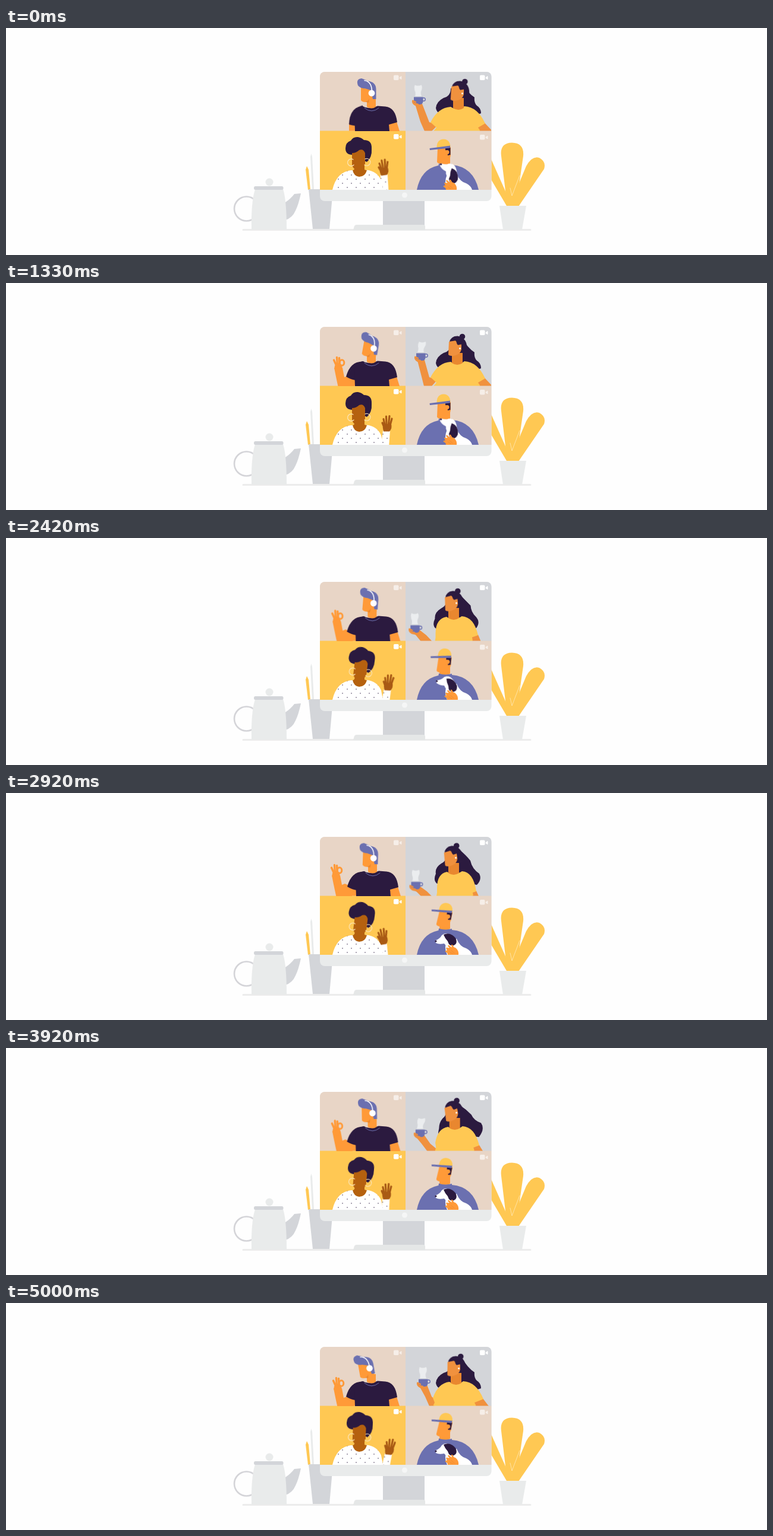
An HTML page without scripts that plays this animation: 1280 by 383 pixels, repeating every 5080 ms.

```html
<!DOCTYPE html>
<html lang="en">
<head>
<meta charset="utf-8">
<title>Video call</title>
<style>
html, body { margin: 0; width: 100%; height: 100%; overflow: hidden; background: #fefefe; }
svg { display: block; width: 100%; height: 100%; }

:root {
  --navy: #2b1a3f; --blue: #6b70b0; --yellow: #ffc853; --skin: #ff9a38;
  --tan: #f0913e; --brown: #b5610f; --beige: #e8d5c6; --mid: #d3d5d9; --pale: #e9ebeb;
}
.navy { fill: var(--navy); } .blue { fill: var(--blue); } .yellow { fill: var(--yellow); }
.skin { fill: var(--skin); } .tan { fill: var(--tan); } .brown { fill: var(--brown); }
.beige { fill: var(--beige); } .mid { fill: var(--mid); } .pale { fill: var(--pale); }
.white { fill: #fff; } .shade { fill: #e9872f; }
.line { fill: none; stroke-linecap: round; stroke-linejoin: round; }

.move { animation: 5.08s ease-in-out infinite; }

/* Listener with headphones */
.dj-head { animation-name: dj-head; transform-origin: 614px 130px; }
@keyframes dj-head {
  0%, 5% { transform: none; }
  17%, 41% { transform: rotate(10deg); }
  52%, 74% { transform: translateX(2.5px) rotate(2deg); }
  83%, 100% { transform: rotate(-10deg); }
}
.dj-body { animation-name: dj-body; }
@keyframes dj-body {
  0%, 41% { transform: none; }
  52%, 74% { transform: translateX(2px); }
  83%, 100% { transform: none; }
}
.dj-sleeve { animation-name: dj-sleeve; transform-origin: 594px 140px; }
@keyframes dj-sleeve {
  0%, 6% { transform: rotate(-14deg); }
  18%, 100% { transform: none; }
}
.dj-arm { animation-name: dj-arm; }
@keyframes dj-arm {
  0%, 6% { transform: translate(8px, 54px); }
  18%, 41% { transform: none; }
  52%, 74% { transform: translate(-4px, -4px); }
  83%, 100% { transform: translate(-1px, 1px); }
}

/* Coffee drinker */
.cof-head { animation-name: cof-head; transform-origin: 763px 110px; }
@keyframes cof-head {
  0% { transform: translate(4px, 0) rotate(1deg); }
  26.2% { transform: none; }
  37.8% { transform: translate(-5px, 0) rotate(-1.5deg); }
  57.5% { transform: translate(-7px, -1px) rotate(-8deg); }
  70.5% { transform: translate(-8px, -2px) rotate(-13deg); }
  85.2% { transform: translate(-3px, 0) rotate(-6deg); }
  98.4%, 100% { transform: translate(-2px, 0) rotate(-2deg); }
}
.cof-neck { animation-name: cof-neck; }
@keyframes cof-neck {
  0% { transform: translateX(2px); }
  26.2% { transform: none; }
  37.8%, 70.5% { transform: translateX(-6px); }
  85.2%, 100% { transform: translateX(-2px); }
}
.cof-hair { animation-name: cof-hair; }
@keyframes cof-hair {
  0%, 26.2%, 98.4%, 100% { d: path("M748 102Q748 115 736 118Q724 124 723 135Q724 142 730 144L780 150L799 144Q799 135 792 131Q787 126 788 117Q776 109 768 94Z"); }
  37.8% { d: path("M742 102Q742 115 731 119Q720 125 720 136Q714 148 722 153L782 147L790 149Q796 138 785 130Q780 122 782 114Q772 106 763 94Z"); }
  57.5% { d: path("M740 100Q743 114 732 119Q721 126 723 136Q718 148 725 153L775 152L792 155Q801 146 796 136Q784 128 781 114Q774 105 762 95Z"); }
  70.5% { d: path("M740 100Q741 114 734 119Q729 126 729 136Q726 146 728 150L780 148L795 151Q807 137 800 126Q787 122 782 112Q773 102 760 95Z"); }
}
.cof-shirt { animation-name: cof-shirt; }
@keyframes cof-shirt {
  0%, 26.2% { d: path("M748 133Q727 134 714 159L724 168L719 174H798L794 168L806 161Q793 133 771 132Q761 141 748 133Z"); }
  37.8% { d: path("M740 133Q721 136 720 160L720 168L719 174H784L783 167L797 162Q788 133 766 132Q752 141 740 133Z"); }
  57.5%, 70.5% { d: path("M742 133Q725 136 725 160L725 168L724 174H786L785 168L791 166Q786 133 767 132Q754 141 742 133Z"); }
  85.2%, 100% { d: path("M746 133Q727 135 718 160L721 168L718 174H791L788 168L803 162Q791 133 769 132Q758 141 746 133Z"); }
}
.cof-far { animation-name: cof-far; }
@keyframes cof-far {
  0%, 26.2% { d: path("M790 165L805 160L818 174L797 174Z"); }
  37.8% { d: path("M782 166L797 161L802 174L784 174Z"); }
  57.5%, 70.5% { d: path("M783 167L791 165L795 174L785 174Z"); }
  85.2%, 100% { d: path("M786 166L802 161L812 174L790 174Z"); }
}
.cof-arm { animation-name: cof-arm; }
@keyframes cof-arm {
  0% { d: path("M687 125L700 128L712 159L727 163L716 174L704 174L697 158Z"); }
  26.2% { d: path("M691 127L704 130L712 159L726 163L716 174L703 174L699 158Z"); }
  37.8% { d: path("M680 154L694 152L706 162L717 174L716 174L697 174L688 161Z"); }
  57.5% { d: path("M682 160L697 158L708 166L716 174L715 174L698 174L690 166Z"); }
  70.5% { d: path("M684 156L699 152L712 164L724 174L723 174L706 174L694 163Z"); }
  85.2%, 100% { d: path("M694 138L708 138L716 158L725 166L720 174L712 174L705 158Z"); }
}
.cup { animation-name: cup; }
@keyframes cup {
  0% { transform: translate(-4px, -2px); }
  26.2% { transform: none; }
  37.8% { transform: translate(-11px, 26px); }
  57.5% { transform: translate(-8.5px, 31.5px); }
  70.5% { transform: translate(-5px, 26px); }
  85.2%, 100% { transform: translate(4px, 10px); }
}
.steam { animation: steam 1.27s ease-in-out infinite alternate; transform-origin: 697px 117px; }
@keyframes steam { from { transform: skewX(4deg); } to { transform: skewX(-6deg) scaleY(.95); } }

/* Waving caller */
.wav-head { animation-name: wav-head; transform-origin: 595px 248px; }
@keyframes wav-head {
  0%, 26.2% { transform: none; }
  37.8%, 57.5% { transform: rotate(7deg); }
  70.5% { transform: rotate(6deg); }
  85.2% { transform: rotate(4deg); }
  98.4%, 100% { transform: rotate(2.5deg); }
}
.wave { animation-name: wave; transform-origin: 638px 280px; }
@keyframes wave {
  0% { transform: translateY(-2px) rotate(-8deg); }
  26.2% { transform: none; }
  37.8% { transform: translateY(8px) rotate(16deg); }
  57.5% { transform: translateY(5px) rotate(-10deg); }
  70.5% { transform: translateY(5px) rotate(-3deg); }
  85.2% { transform: translateY(5px) rotate(1deg); }
  98.4%, 100% { transform: translateY(5px) rotate(6deg); }
}

/* Dog owner */
.cap-head { animation-name: cap-head; transform-origin: 740px 213px; }
@keyframes cap-head {
  0%, 43% { transform: none; }
  52%, 100% { transform: translate(1px, -1.5px) rotate(11deg); }
}
.dog-head { animation-name: dog-head; transform-origin: 755px 252px; }
@keyframes dog-head {
  0%, 42% { transform: rotate(40deg); }
  52%, 100% { transform: none; }
}
.dog-ear { animation-name: dog-ear; transform-origin: 747px 247px; }
@keyframes dog-ear {
  0%, 42% { transform: translate(5px, 3px) rotate(44deg); }
  52%, 100% { transform: none; }
}
.paw { animation-name: paw; }
@keyframes paw {
  0%, 42% { transform: translateX(-3px); }
  52%, 100% { transform: none; }
}
</style>
</head>
<body>
<svg viewBox="0 0 1280 383" role="img" aria-label="Four people in a video call on a desktop screen">
  <defs>
    <clipPath id="tl"><path d="M528 74H672V173.500H528Z"/></clipPath>
    <clipPath id="tr"><path d="M672 74H816V173.500H672Z"/></clipPath>
    <clipPath id="bl"><path d="M528 173.500H672V273H528Z"/></clipPath>
    <clipPath id="br"><path d="M672 173.500H816V273H672Z"/></clipPath>
    <clipPath id="screen"><rect x="528" y="74" width="288.500" height="218" rx="8"/></clipPath>
    <pattern id="dots" width="15" height="14" patternUnits="userSpaceOnUse">
      <path fill="#fff" d="M0 0H15V14H0Z"/>
      <circle class="navy" cx="4" cy="3" r=".75"/>
      <circle class="navy" cx="11" cy="10" r=".75"/>
    </pattern>
    <g id="cam"><rect width="8.500" height="8.500" rx="1.800"/><path d="M10 4.200L13 2V7L10 5Z" stroke="#fff" stroke-linejoin="round"/></g>
  </defs>

  <!-- Desk -->
  <path class="line" d="M399 340.500H882" stroke="#ececec" stroke-width="3"/>
  <circle class="line" cx="404.500" cy="305" r="20.500" stroke="#d4d4d8" stroke-width="2.600"/>
  <path class="mid" d="M470 294Q479 288 485 280L496 279Q492 298 487 308Q482 320 470 324Z"/>
  <path class="pale" d="M419 272H466Q472 290 472 340H413Q412 294 419 272Z"/>
  <circle class="pale" cx="443" cy="260" r="6.500"/>
  <rect class="mid" x="417" y="267" width="49.500" height="6" rx="2.500"/>
  <path class="yellow" d="M504 239L506 233L509 239L512 273H508Z"/>
  <path class="pale" d="M512 217L513.500 212L515 217L518 273H515Z"/>
  <path class="mid" d="M509 272H550L544 339H516Z"/>

  <g class="yellow">
    <path d="M815 219L851 300H842L815 254Z"/>
    <path d="M843 300L833 216Q830 194 851 193.500Q872 194 870 216L858 300Z"/>
    <path d="M847 300L875 233Q885 215 897 219Q909 225 905 238L862 301Z"/>
  </g>
  <path class="line" d="M848 270L851 283L864 249" stroke="#fff3d8" stroke-width=".6"/>
  <path class="pale" d="M830 300H875L868 340H836Z"/>

  <!-- Monitor -->
  <path class="mid" d="M634 290H704V333H634Z"/>
  <path fill="#e5e7e7" d="M584 341L586 334Q587 332 590 332H702Q705 332 705 335V341Z"/>
  <g clip-path="url(#screen)">
    <path class="pale" d="M528 74H817V292H528Z"/>
    <path class="beige" d="M528 74H672V174H528Z"/>
    <path class="mid" d="M672 74H817V174H672Z"/>
    <path class="yellow" d="M528 173.500H672V273H528Z"/>
    <path class="beige" d="M672 173.500H817V273H672Z"/>
  </g>
  <circle cx="670.500" cy="282" r="4.500" fill="#f5f6f6"/>

  <!-- Listener with headphones -->
  <g clip-path="url(#tl)">
    <path class="skin" d="M577 160H589V174H577Z"/>
    <g class="move dj-arm">
      <path class="skin" d="M552 143L566 143L569 159L574 157L588 163L586 174V190H562Q556 164 552 143Z"/>
      <ellipse class="skin" cx="559" cy="143" rx="6.500" ry="8"/>
      <path class="line" d="M556 140L551.500 130M557.500 140L556.500 125.500M561 139L560.500 126.500" stroke="var(--skin)" stroke-width="3.400"/>
      <ellipse class="line" cx="565" cy="134.500" rx="3.800" ry="4.800" stroke="var(--skin)" stroke-width="3"/>
    </g>
    <g class="move dj-body">
      <path class="skin" d="M643 160L657 158L662 174H645Z"/>
      <path class="navy move dj-sleeve" d="M602 132.500Q579 131 572 158Q580 163 588 164L602 160Z"/>
      <path class="navy" d="M600 132Q588 134 586 148L587 174H645L644 163L658 159Q655 134 638 132.500L625 131.500Q610 138 600 132Z"/>
      <path class="skin" d="M607 120H622V133Q615 138 607 133Z"/>
      <path class="line" d="M603 135Q615 145 627 135" stroke="var(--blue)" stroke-width="1"/>
    </g>
    <g class="move dj-head">
      <path class="skin" d="M597 99V122Q600 126 608 124.500L609 132H621V101Z"/>
      <path class="shade" d="M604 124.500Q609 124 611 119L610 126Z"/>
      <path class="blue" d="M592 97Q588 86 598 85Q604 87 609 89.500Q622 91 622.500 103V120H617L613.500 105L604 102Q596 102 592 97Z"/>
      <path class="line" d="M603 88.500Q615 90 615.500 107" stroke="#fff" stroke-width="1.600"/>
      <circle class="white" cx="615" cy="110" r="5.400"/>
    </g>
  </g>

  <!-- Coffee drinker -->
  <g clip-path="url(#tr)">
    <path class="navy move cof-hair"/>
    <path class="tan move cof-far"/>
    <path class="tan move cof-arm"/>
    <path class="yellow move cof-shirt"/>
    <path class="shade move cof-neck" d="M750 118H768V135Q759 141 750 135Z"/>
    <g class="move cof-head">
      <circle class="navy" cx="767.500" cy="90.500" r="4.800"/>
      <path class="navy" d="M746 99Q749 89 760 89.500Q773 92 775 105L776 118H766Z"/>
      <path class="tan" d="M745 99L744 121Q747 124 754 122.500Q764 121 766 112V104L757 97Z"/>
      <path class="navy" d="M745.500 97Q757 94 758 101Q759 106 764 105L768 96L757 91Z"/>
      <circle class="tan" cx="763" cy="107" r="3"/>
      <circle class="white" cx="763.500" cy="110.500" r="1.400"/>
    </g>
    <g class="move cup">
      <path class="steam" fill="#ebedef" d="M692 117Q694 112 692 107Q691 102 693 98Q698 101 704 98Q706 103 703 108Q701 112 703 117Z"/>
      <path class="tan" d="M687 124Q689 122 693 127L703 130Q706 133 701 135L692 133Q686 130 687 124Z"/>
      <circle class="line" cx="706.500" cy="122.500" r="2.800" stroke="var(--blue)" stroke-width="1.400"/>
      <path class="blue" d="M690 118.500H705.500V126Q705 131 700 131H695Q690 131 690 125Z"/>
      <path class="line" d="M689 125L693 127M690 129L697 131" stroke="var(--tan)" stroke-width="2.400"/>
    </g>
  </g>

  <!-- Waving caller -->
  <g clip-path="url(#bl)">
    <g class="move wave">
      <path fill="url(#dots)" d="M634 249H646L643 290H629Z"/>
      <path class="line" stroke="#a95a14" stroke-width="3.200" d="M637 239L635 229.500M640 238L639.500 225M643.500 238L645 224.500M646 240L649 229M636 243L633 236"/>
      <path fill="#a95a14" d="M634 238H648Q650 245 645 250.500H635Q633 244 634 238Z"/>
    </g>
    <path fill="url(#dots)" d="M549 273Q556 243 580 240L606 239.500Q624 241 631 257L634 273Z"/>
    <path class="brown" d="M583 240Q587 240 587 232H603V239L607 240Q604 251 594 251Q585 250 583 240Z"/>
    <g class="move wav-head">
      <path class="navy" d="M583 214Q571 214 571 203Q571 193 580 190Q584 183 592 184Q598 185 602 189Q616 189 615 204Q616 218 607 226L598 222Z"/>
      <path class="brown" d="M582 211Q589 211 594 206Q601 203 604 211V229Q601 240 592 239Q583 239 582 230Z"/>
      <path class="line" d="M584 222A6 6 0 1 0 585 231M604 221A6 6 0 1 1 603 231" stroke="#fbe6bd" stroke-width="1.200"/>
    </g>
  </g>

  <!-- Dog owner -->
  <g clip-path="url(#br)">
    <path class="blue" d="M691 273Q698 238 727 232L750 231Q786 234 795 273Z"/>
    <path class="skin" d="M730 217H747V229Q739 233 729 229Z"/>
    <path class="blue" d="M728 228.500Q738 232 750 229V235H727Z"/>
    <g class="move cap-head">
      <path class="skin" d="M726 202L725 226Q727 230 736 228Q747 226 748 214V201Z"/>
      <path class="navy" d="M739 202H747.500V214L743 215L742 207L739 206Z"/>
      <circle class="skin" cx="742" cy="209.500" r="3.500"/>
      <path class="yellow" d="M724.500 203Q724 188 736 187.500Q747 188 747.500 201Z"/>
      <path class="blue" d="M712.500 203L747 198.500V202.500L713 206Z"/>
    </g>
    <path class="white" d="M742 273Q736 261 742 247L758 246Q763 259 774 262Q782 266 784 273Z"/>
    <g class="move dog-head">
      <path class="white" d="M722 249Q730 246 733 240Q740 234 748 240L758 248Q760 257 752 260Q742 261 737 254Q728 256 723 253Z"/>
      <circle class="navy" cx="723" cy="250" r="1.600"/>
    </g>
    <path class="navy move dog-ear" d="M736 239Q744 235 751 240Q760 246 757 254Q751 261 745 255Q743 249 739 245Z"/>
    <g class="move paw">
      <path class="skin" d="M741 264Q747 258 756 261Q762 266 761 273H743Z"/>
      <path class="line" d="M747 264L741.500 262M749 262L744.500 258M753 262L750 257M743 269L740 267" stroke="var(--skin)" stroke-width="2.600"/>
      <path class="line" d="M746 268L751 271M749 266L754 270" stroke="#e9872f" stroke-width=".7"/>
    </g>
  </g>

  <g fill="#fff">
    <use href="#cam" x="652" y="79.500" opacity=".6"/>
    <use href="#cam" x="797" y="79.500"/>
    <use href="#cam" x="652" y="179"/>
    <use href="#cam" x="797" y="180" opacity=".6"/>
  </g>
</svg>
</body>
</html>
```
